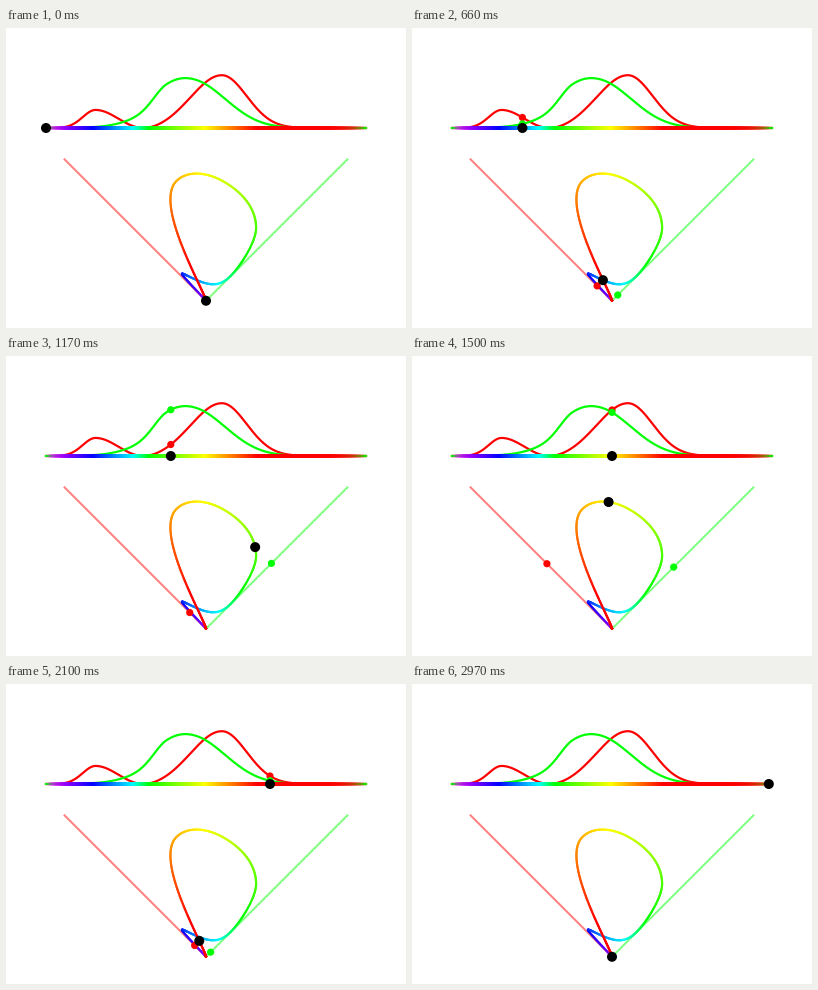
These frames come from a looping animation (400x300 px, 3 s). A matplotlib script:

```python
import numpy as np
import matplotlib.pyplot as plt
from matplotlib.animation import FuncAnimation
from matplotlib.collections import LineCollection
from matplotlib.patches import Circle

W, H, DPI = 400, 300, 100
FRAMES, INTERVAL = 100, 30
WL_MIN, WL_MAX = 380, 780
LEFT, BASE, SPAN, RISE = 40, 100, 320, 50     # upper plot, px
ORIGIN, UNIT = np.array([200, 272.8]), 100    # lower plot, px
RED_AXIS = np.array([-1, -1]) / np.sqrt(2)
GREEN_AXIS = np.array([1, -1]) / np.sqrt(2)
RED, GREEN = (1, 0, 0), (0, 1, 0)


def lobe(wl, mu, s1, s2):
    """Gaussian with a different width on each side of its peak."""
    return np.exp(-0.5 * ((wl - mu) / np.where(wl < mu, s1, s2)) ** 2)


def red_response(wl):
    return (1.056 * lobe(wl, 599.8, 37.9, 31.0)
            + 0.362 * lobe(wl, 442.0, 16.0, 26.7)
            - 0.065 * lobe(wl, 501.1, 20.4, 26.2))


def green_response(wl):
    return (0.821 * lobe(wl, 568.8, 46.9, 40.5)
            + 0.286 * lobe(wl, 530.9, 16.3, 31.1))


def spectrum(wl):
    """RGBA of each wavelength, fading out at both ends."""
    r = np.interp(wl, [380, 440, 510, 580, 780], [1, 0, 0, 1, 1])
    g = np.interp(wl, [440, 490, 580, 645], [0, 1, 1, 0])
    b = np.interp(wl, [490, 510], [1, 0])
    a = np.interp(wl, [380, 420, 700, 780], [0, 1, 1, 0])
    return np.stack([r, g, b, a], axis=-1)


def px(n):
    return n * 72 / DPI


def to_x(wl):
    return LEFT + SPAN * (wl - WL_MIN) / (WL_MAX - WL_MIN)


def to_plane(red, green):
    return (ORIGIN + UNIT * np.multiply.outer(red, RED_AXIS)
            + UNIT * np.multiply.outer(green, GREEN_AXIS))


fig = plt.figure(figsize=(W / DPI, H / DPI), dpi=DPI, facecolor="white")
ax = fig.add_axes([0, 0, 1, 1])
ax.set(xlim=(0, W), ylim=(H, 0))
ax.axis("off")

wl = np.arange(WL_MIN, WL_MAX + 1.0)
xs = to_x(wl)


def rainbow(points, width, z):
    segs = np.stack([points[:-1], points[1:]], axis=1)
    lines = LineCollection(segs, colors=spectrum(wl[:-1]), linewidths=px(width),
                           capstyle="round", zorder=z)
    lines.set_snap(False)
    ax.add_collection(lines, autolim=False)


for response, axis, color in ((red_response, RED_AXIS, RED),
                              (green_response, GREEN_AXIS, GREEN)):
    ax.plot(xs, BASE - RISE * response(wl), color=color, lw=px(2.2), zorder=2)
    tip = ORIGIN + 2 * UNIT * axis
    ax.plot(*zip(ORIGIN, tip), color=color, alpha=0.5, lw=px(2), zorder=1)

rainbow(np.column_stack([xs, np.full_like(xs, BASE)]), 4, 3)
rainbow(to_plane(red_response(wl), green_response(wl)), 2.2, 3)


def dot(color, radius, z):
    return ax.add_patch(Circle((0, 0), radius, fc=color, lw=0, zorder=z))


# Each pair: upper plot, lower plot
red_dots = [dot(RED, 3.6, 4) for _ in range(2)]
green_dots = [dot(GREEN, 3.6, 5) for _ in range(2)]
black_dots = [dot("black", 5, 6) for _ in range(2)]


def update(i):
    w = WL_MIN + (WL_MAX - WL_MIN) * i / FRAMES
    x, r, g = to_x(w), red_response(w), green_response(w)
    places = ((red_dots, BASE - RISE * r, to_plane(r, 0)),
              (green_dots, BASE - RISE * g, to_plane(0, g)),
              (black_dots, BASE, to_plane(r, g)))
    for (upper, lower), y, point in places:
        upper.center = (x, y)
        lower.center = tuple(point)
    return red_dots + green_dots + black_dots


anim = FuncAnimation(fig, update, frames=FRAMES, interval=INTERVAL,
                     repeat=True, repeat_delay=0, blit=False)
plt.show()
```
